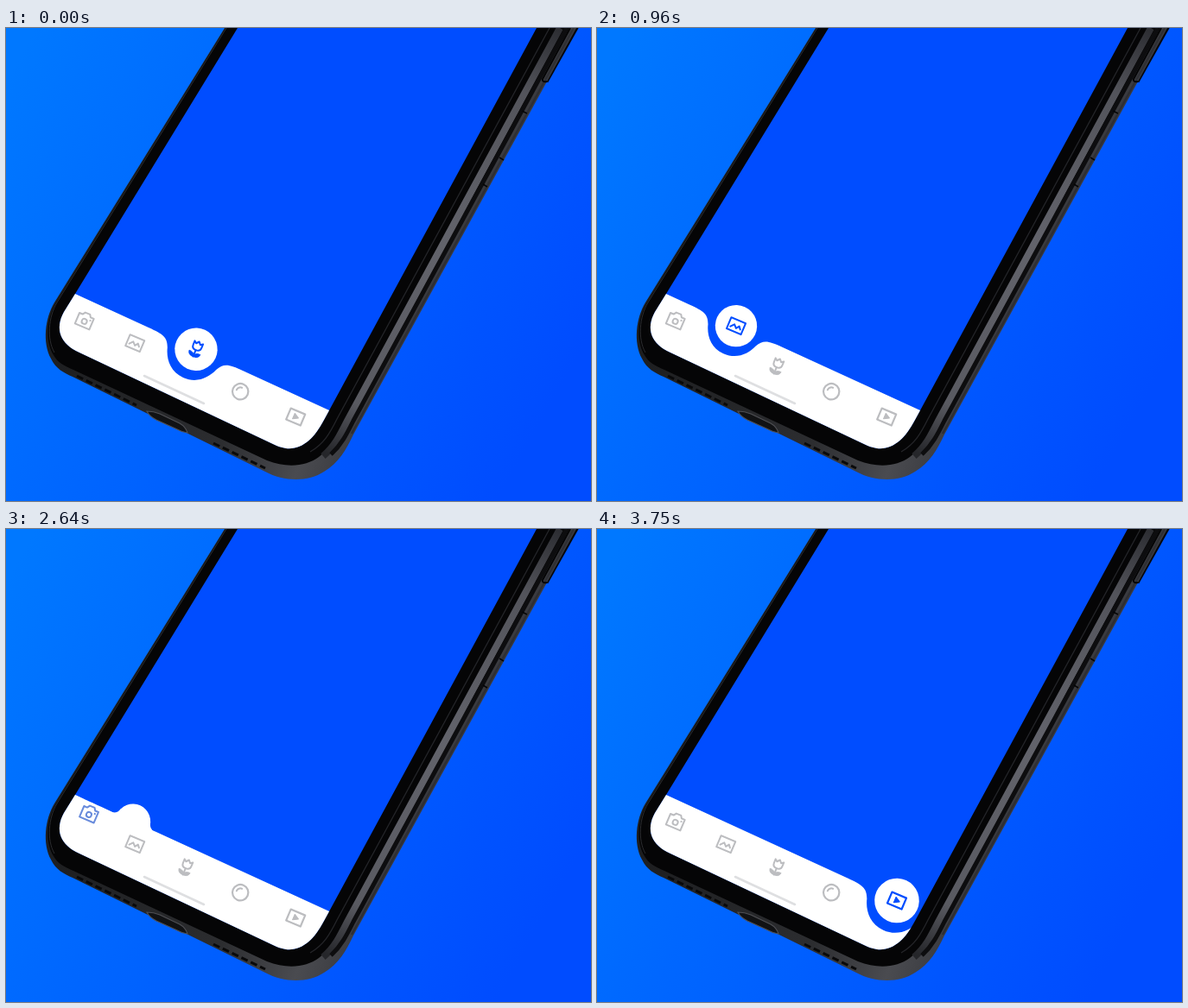
Recreate the animation shown at these times as an HTML page with a canvas. Size 677x548 px, loop 3.78 s.

```html
<!DOCTYPE html>
<html lang="en">
<head>
<meta charset="utf-8">
<title>Tab bar</title>
<style>
html, body { margin: 0; width: 100%; height: 100%; overflow: hidden; background: #0060ff; }
canvas { display: block; width: 677px; height: 548px; }
</style>
</head>
<body>
<canvas id="stage" width="677" height="548"></canvas>
<script>
const ctx = document.getElementById('stage').getContext('2d');
const LOOP = 3780, STEP = 30;
const BLUE = [0, 77, 255], GREY = [188, 189, 192];
const SLOPE = 0.459, TILT = Math.atan(SLOPE);
const TABS = [103, 161, 220, 283, 347];
const HOPS = [
  { at: 180, from: 2, to: 1 },
  { at: 1260, from: 1, to: 0 },
  { at: 2340, from: 0, to: 4 }
];

const clamp = v => Math.max(0, Math.min(1, v));
const mix = (a, b, p) => a + (b - a) * p;
const ease = v => {
  const p = clamp(v);
  return p < 0.5 ? 2 * p * p : 1 - 2 * (1 - p) * (1 - p);
};
const edgeY = x => 308 + (x - 80) * SLOPE;
const sizeAt = x => 1 + (x - 220) * 0.00035;
const along = (x, s) => x + s * Math.cos(TILT);

function shape(d, fill, stroke, width) {
  const p = new Path2D(d);
  if (fill) { ctx.fillStyle = fill; ctx.fill(p); }
  if (stroke) { ctx.strokeStyle = stroke; ctx.lineWidth = width; ctx.stroke(p); }
}

function ramp(x0, y0, x1, y1, ...stops) {
  const g = ctx.createLinearGradient(x0, y0, x1, y1);
  stops.forEach(([p, c]) => g.addColorStop(p, c));
  return g;
}

// Position of the notch, the discs and the icons at a given time
function pose(t) {
  const hop = HOPS.filter(h => t >= h.at).pop();
  const lift = [0, 0, 0, 0, 0];
  if (!hop) {
    lift[2] = 1;
    return { lift, notch: { x: TABS[2], k: 1 }, discs: [{ x: TABS[2], d: 0, r: 1, f: 0 }] };
  }
  const u = t - hop.at, a = TABS[hop.from], b = TABS[hop.to];
  const far = Math.abs(hop.to - hop.from) > 1;
  lift[hop.from] = 1 - ease(u / (far ? 570 : 380));
  lift[hop.to] = far ? ease((u - 770) / 280) : ease((u - 190) / 190);
  if (far) {
    const k = u < 500 ? 1 - ease(u / 280) : ease((u - 650) / 380);
    const squash = clamp(Math.min(u / 250, (1050 - u) / 250));
    return {
      lift,
      notch: { x: mix(a, b, ease((u - 100) / 1050)), k },
      discs: [{ x: mix(a, b, ease(u / 1000)), d: 0, r: 1 - 0.16 * squash, f: squash * (1 - k) }]
    };
  }
  // Short hop: the old disc sinks behind while a new one rises ahead
  const p = clamp(u / 390), q = 1 - p, discs = [];
  if (p < 1) discs.push({ x: along(a, 45 * p), d: 45 * p ** 3, r: 1 - 0.3 * p, f: 0 });
  if (p > 0) discs.push({ x: along(b, -37 * q), d: 34 * q * q, r: 1 - 0.4 * q, f: 0 });
  return { lift, notch: { x: mix(a, b, ease(u / 510)), k: 1 }, discs };
}

function onEdge(x, draw) {
  ctx.save();
  ctx.translate(x, edgeY(x));
  ctx.rotate(TILT);
  draw(sizeAt(x));
  ctx.restore();
}

function drawBar({ x, k }) {
  onEdge(x, s => {
    const w = v => v * s, h = v => v * s * k;
    ctx.beginPath();
    ctx.moveTo(-500, 0);
    ctx.lineTo(w(-60), 0);
    ctx.bezierCurveTo(w(-42), 0, w(-36), h(1), w(-31), h(12));
    ctx.bezierCurveTo(w(-27), h(24), w(-17), h(36), 0, h(36));
    ctx.bezierCurveTo(w(17), h(36), w(27), h(24), w(31), h(12));
    ctx.bezierCurveTo(w(36), h(1), w(42), 0, w(60), 0);
    ctx.lineTo(500, 0);
    ctx.lineTo(500, 300);
    ctx.lineTo(-500, 300);
    ctx.fill();
  });
}

function drawDisc({ x, d, r, f }) {
  onEdge(x, s => {
    const R = 24.7 * s * r;
    ctx.beginPath();
    ctx.arc(0, d, R, 0, 7);
    ctx.fill();
    if (f <= 0) return;
    const top = -R * 0.38 * f;
    ctx.beginPath();
    ctx.moveTo(-R * 1.4, 1);
    ctx.quadraticCurveTo(-R, 0, -R * 0.93, top);
    ctx.lineTo(R * 0.93, top);
    ctx.quadraticCurveTo(R, 0, R * 1.4, 1);
    ctx.fill();
  });
}

const ICONS = [
  c => {
    shape('M-9-5.5H-5L-3-8.5H3L5-5.5H9V8H-9Z', null, c, 2);
    shape('M3 1.5A3 3 0 1 1-3 1.5A3 3 0 1 1 3 1.5Z', null, c, 2);
    shape('M5-3H7V-1H5Z', c);
  },
  c => {
    shape('M-9-7H9V7H-9Z', null, c, 2);
    shape('M-6 3L-2.5-1L1 2.5L3.5-1L6 2', null, c, 2);
  },
  c => {
    shape('M-5.2-8.5V-4Q-5.2 1 0 1T5.2-4V-8.5L2.6-6.5L0-9.5L-2.6-6.5Z', null, c, 2);
    shape('M0 1V9', null, c, 2);
    shape('M0 9C-4 9.5-6.5 7.5-7 4C-3 3.5 0 5.5 0 9C0 5.5 3 3.5 7 4C6.5 7.5 4 9.5 0 9Z', c, c, 0.8);
  },
  c => {
    shape('M9.2 0A9.2 9.2 0 1 1-9.2 0A9.2 9.2 0 1 1 9.2 0Z', null, c, 2.2);
    shape('M-4.8 0A4.8 4.8 0 0 1 0-4.8', null, c, 2);
  },
  c => {
    shape('M-9-7H9V7H-9Z', null, c, 2.2);
    shape('M-2.5-3.5L3.5 0L-2.5 3.5Z', c, c, 1);
  }
];

function drawIcon(i, up) {
  const x = TABS[i] - 11.8 * (1 - up), y = edgeY(TABS[i]) + 20 * (1 - up);
  const color = `rgb(${GREY.map((g, n) => Math.round(mix(g, BLUE[n], up)))})`;
  ctx.save();
  ctx.translate(x, y);
  ctx.rotate(0.4);
  ctx.lineJoin = ctx.lineCap = 'round';
  ICONS[i](color);
  ctx.restore();
}

function drawBody() {
  ctx.fillStyle = ramp(0, 60, 640, 420, [0, '#0078ff'], [1, '#004cff']);
  ctx.fillRect(0, 0, 677, 548);
  // side buttons
  shape('M662-4L625 62', null, '#08080a', 5);
  shape('M603 98L556 185', null, '#17181b', 3);
  // frame
  shape('M253 0L56 318C45 336 42 365 52 383C58 395 66 399 77 404L300 514C322 526 350 526 368 514' +
    'C385 504 394 488 402 471L660 0Z', ramp(50, 380, 400, 500, [0, '#1d1e20'], [0.6, '#2c2d30'], [0.85, '#4a4b50'], [1, '#3a3b40']));
  // glass rim
  shape('M254 0L58 318C47 336 45 362 55 379C60 388 67 391 78 396L302 501C325 510 347 508 362 497' +
    'C374 488 381 475 388 462L652 0Z', '#050506');
  shape('M255 0L59 318C49 335 47 360 56 376', null, '#2b2c2f', 1);
  // polished side
  const shine = ramp(640, 0, 375, 495, [0, '#2c2d32'], [0.15, '#53545b'], [0.5, '#62636b'], [0.88, '#595a61'], [1, '#25262a']);
  shape('M641 0L395 455C386 473 380 485 367 496', null, shine, 8);
  shape('M629 0L383 453C375 469 368 482 352 491', null, '#242529', 1.3);
  shape('M649 0L402 455C394 471 388 483 376 494', null, '#0d0d0f', 5);
  shape('M657 0L400 470', null, '#2e2f34', 2.5);
  shape('M653 0L621 59Q620 63 626 62', null, '#050506', 2);
  shape('M597 96L603 99M571 150L576 153M552 181L557 184', null, '#060607', 1.5);
  // port and speaker slots
  shape('M163 444Q171 444 178 447L201 458Q208 462 210 469Q203 468 196 464L174 454Q166 450 163 444Z', '#111214', '#4d4e53', 1.2);
  ctx.setLineDash([8, 4]);
  shape('M82 403L151 437M240 481L300 510', null, '#09090a', 3);
  ctx.setLineDash([]);
}

const SCREEN = new Path2D('M268 0H614L374 443L368 454C357 475 343 489 324 487C318 486 313 484 309 482' +
  'L85 376C63 366 56 349 67 329L80 308Z');

function draw(t) {
  const { lift, notch, discs } = pose(t);
  drawBody();
  ctx.save();
  ctx.clip(SCREEN);
  ctx.fillStyle = `rgb(${BLUE})`;
  ctx.fillRect(0, 0, 677, 548);
  ctx.fillStyle = '#fff';
  drawBar(notch);
  discs.forEach(drawDisc);
  ctx.lineCap = 'round';
  shape('M160 403L229 435', null, '#dedfe1', 2.6);
  ctx.lineCap = 'butt';
  lift.forEach((up, i) => drawIcon(i, up));
  ctx.restore();
}

function tick(now) {
  draw(Math.floor((now % LOOP) / STEP) * STEP);
  requestAnimationFrame(tick);
}
draw(0);
requestAnimationFrame(tick);
</script>
</body>
</html>
```
